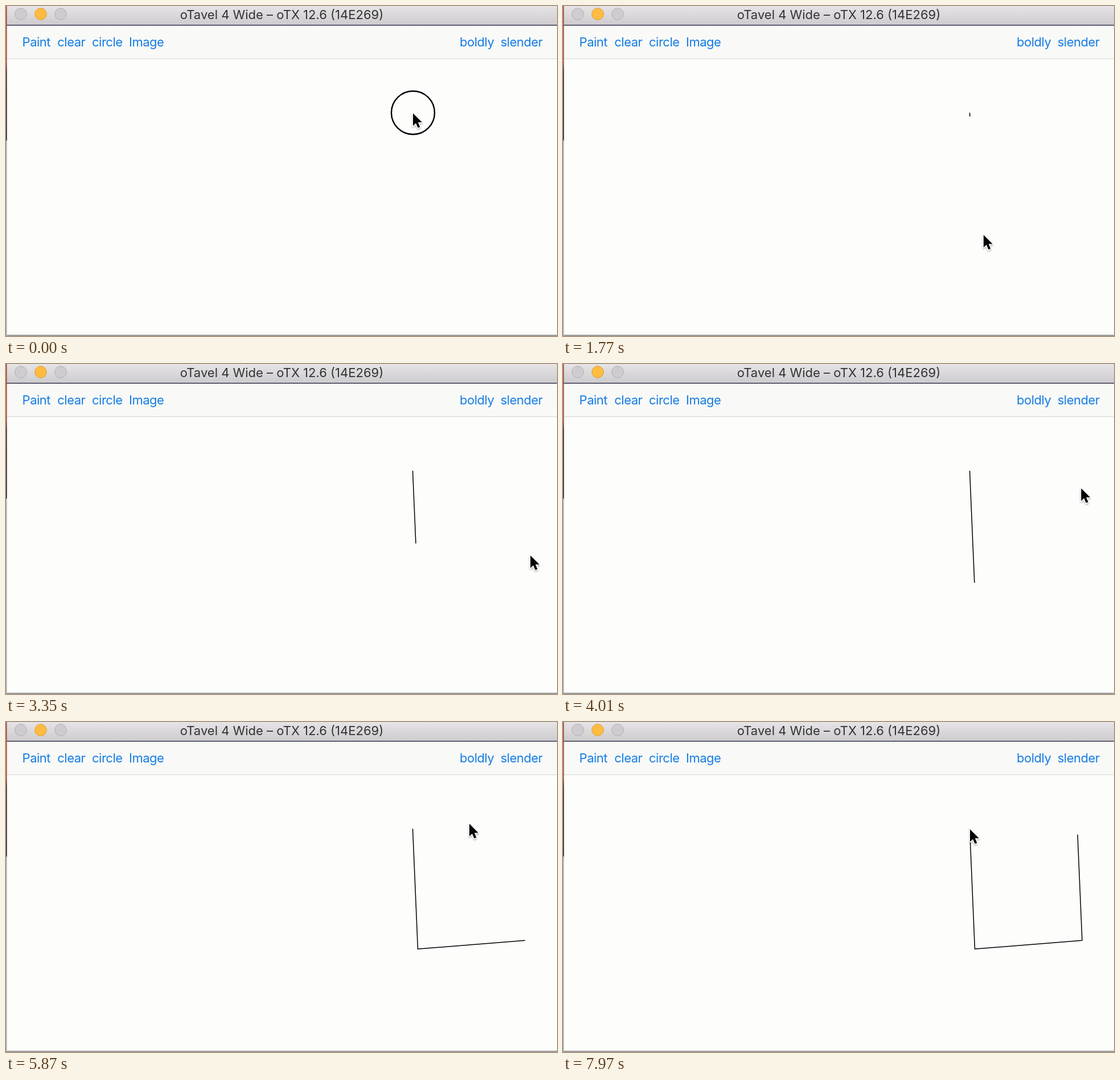
These frames come from a looping animation (968 by 579 pixels, 8000 ms). An HTML page:

```html
<!DOCTYPE html>
<html lang="en">
<head>
<meta charset="utf-8">
<title>Paint demo</title>
<style>
  html, body { margin: 0; width: 100%; height: 100%; overflow: hidden; background: #fdfdfc; }
  svg { display: block; width: 968px; height: 579px; }
  text { font-family: Inter, Roboto, sans-serif; font-size: 22px; letter-spacing: -.5px; }
  .title { fill: #333; letter-spacing: 0; text-anchor: middle; }
  .nav { fill: #147ce5; }
  .line { fill: none; stroke: #000; stroke-width: 1.5; stroke-linejoin: round; }
</style>
</head>
<body>
<svg viewBox="0 0 968 579">
  <defs>
    <linearGradient id="bar" x2="0" y2="1">
      <stop offset="0" stop-color="#e6e4e6"/>
      <stop offset="1" stop-color="#cecbce"/>
    </linearGradient>
    <linearGradient id="edge" x2="0" y2="1">
      <stop offset=".17" stop-color="#b04a35"/>
      <stop offset=".2" stop-color="#3a2522"/>
      <stop offset=".405" stop-color="#241d20"/>
      <stop offset=".41" stop-color="#b0b1b6"/>
    </linearGradient>
    <filter id="shadow" x="-50%" y="-50%" width="200%" height="200%">
      <feDropShadow dx="0" dy="2" stdDeviation="1.5" flood-opacity=".3"/>
    </filter>
  </defs>

  <rect width="968" height="579" fill="#fdfdfc"/>
  <rect y="34" width="968" height="58" fill="#f9f9f7"/>
  <rect y="92" width="968" height="1" fill="#d5d5d5"/>
  <rect width="968" height="33" fill="url(#bar)"/>
  <rect y="33" width="968" height="1.4" fill="#26263f"/>
  <rect y="577" width="968" height="1.4" fill="#6c6c6c"/>
  <rect width="1.6" height="579" fill="url(#edge)"/>

  <g fill="#cfcccf" stroke="#b3b0b3">
    <circle cx="26" cy="14" r="10.3"/>
    <circle cx="61" cy="14" r="10.3" fill="#fdbc40" stroke="#dc9f36"/>
    <circle cx="96" cy="14" r="10.3"/>
  </g>
  <text class="title" x="484.5" y="23">oTavel 4 Wide – oTX 12.6 (14E269)</text>
  <g class="nav">
    <text x="28.6" y="71">Paint</text>
    <text x="90.3" y="71">clear</text>
    <text x="151" y="71">circle</text>
    <text x="216" y="71">Image</text>
    <text x="797" y="71">boldly</text>
    <text x="868.7" y="71">slender</text>
  </g>

  <polyline id="stroke" class="line"/>
  <circle id="ring" r="38" fill="none" stroke="#000" stroke-width="2.4"/>
  <path id="cursor" d="M0 0V22L5 17.3L8.7 25.6L12.4 24L8.8 15.8H15.8Z" stroke="#fff" stroke-width="2.6"
        stroke-linejoin="round" paint-order="stroke" filter="url(#shadow)"/>
</svg>
<script>
const LOOP = 8000;
const BOW = 15; // how far the hand swings sideways between corners

// Corners in click order; draw is when the line leading there grows
const stops = [
  { x: 714.5, y: 187.2, press: 0, release: 290 },
  { x: 723.5, y: 398.2, press: 1400, release: 1650, draw: [1560, 4140] },
  { x: 912, y: 383.2, press: 2360, release: 2880, draw: [4140, 5860] },
  { x: 904, y: 197.5, press: 4300, release: 4700, draw: [7040, 7930] }
];
const home = { ...stops[0], press: 7100, release: LOOP };

const $ = id => document.getElementById(id);
const mix = (a, b, k) => a + (b - a) * k;
const progress = (t, from, to) => Math.min(1, Math.max(0, (t - from) / (to - from)));
const smooth = k => k * k * (3 - 2 * k);
const speedUp = k => k ** 1.38;

function pointerAt(t) {
  const i = stops.findLastIndex(s => t >= s.press);
  const a = stops[i], b = stops[i + 1] || home;
  const k = smooth(progress(t, a.release, b.press));
  const dx = b.x - a.x, dy = b.y - a.y;
  const swing = BOW * Math.sin(Math.PI * k) / Math.hypot(dx, dy);
  return [a.x + dx * k - dy * swing + .5, a.y + dy * k + dx * swing + 1];
}

function lineAt(t) {
  const points = [];
  stops.slice(1).forEach((b, i) => {
    const a = stops[i], k = speedUp(progress(t, ...b.draw));
    if (k > 0) points.push([a.x, a.y], [mix(a.x, b.x, k), mix(a.y, b.y, k)]);
  });
  return points.join(' ');
}

function render(t) {
  $('cursor').setAttribute('transform', `translate(${pointerAt(t)})`);
  $('stroke').setAttribute('points', lineAt(t));
  const pressed = stops.find(s => t >= s.press && t < s.release);
  $('ring').style.display = pressed ? '' : 'none';
  if (pressed) {
    $('ring').setAttribute('cx', pressed.x + .5);
    $('ring').setAttribute('cy', pressed.y);
  }
}

const start = performance.now();
function tick() {
  render((performance.now() - start) % LOOP);
  requestAnimationFrame(tick);
}
tick();
</script>
</body>
</html>
```
